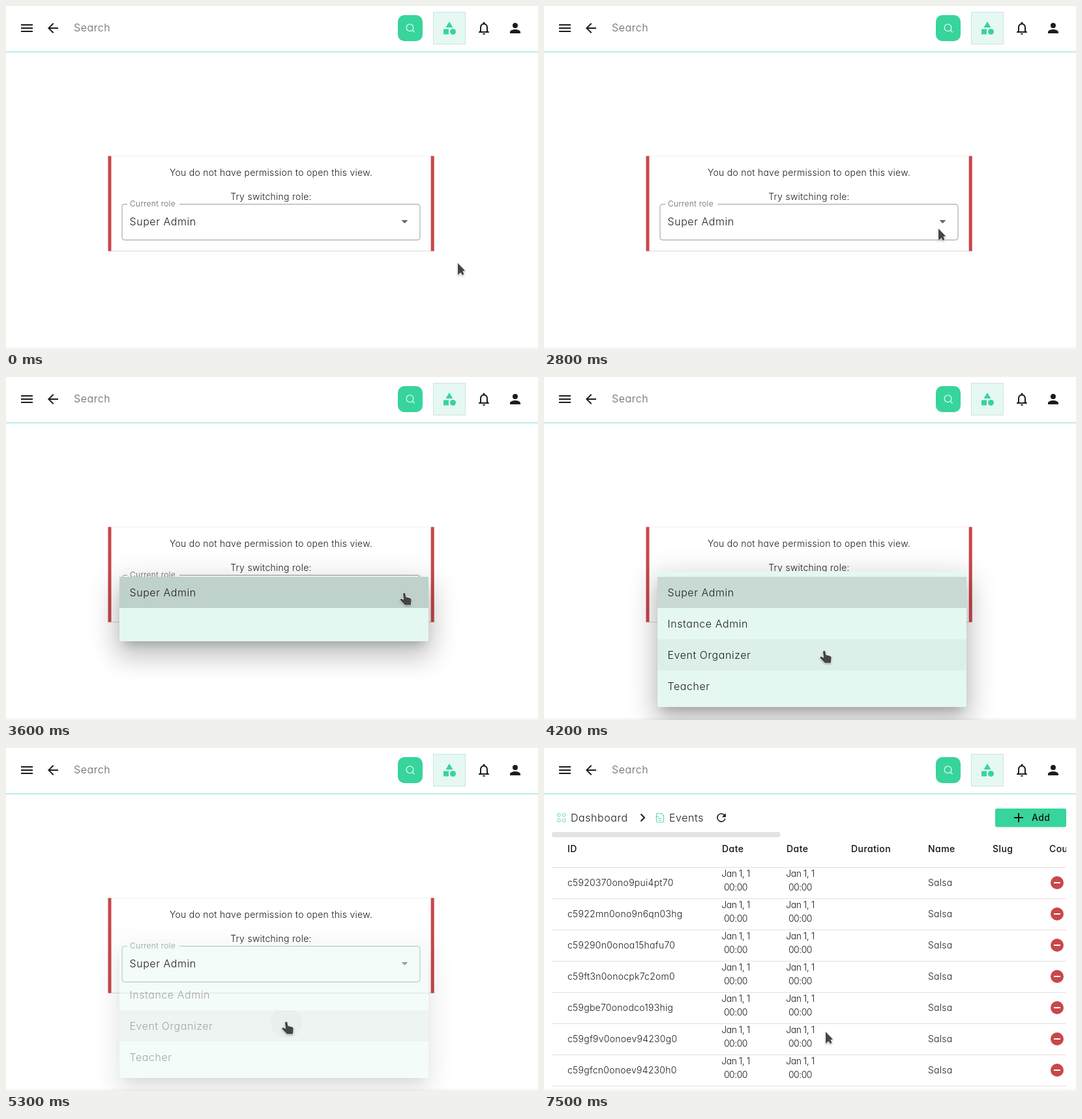
Animation of 816 by 527 pixels, one loop 8.1 s. Source, as an HTML page:

```html
<!DOCTYPE html>
<html lang="en">
<head>
<meta charset="utf-8">
<title>Role switch</title>
<style>
  html, body { margin: 0; width: 100%; height: 100%; overflow: hidden; background: #fff; }
  #stage { position: relative; width: 816px; height: 527px; overflow: hidden; }
  #stage > svg { position: absolute; left: 0; top: 0; }
  text, .row { font-family: Inter, "Open Sans", sans-serif; font-weight: 300; font-feature-settings: "cv11"; fill: #1e1e1e; color: #1e1e1e; }
  .t16, .row { font-size: 16px; letter-spacing: .55px; }
  .t14 { font-size: 14px; letter-spacing: .27px; }
  .t12 { font-size: 12px; letter-spacing: .3px; }
  .id { font-size: 14px; letter-spacing: .27px; }
  .date { font-size: 14px; letter-spacing: -.5px; text-anchor: middle; }
  .head { font-size: 14px; letter-spacing: .45px; font-weight: 500; fill: #111; }
  .mid { text-anchor: middle; }
  .soft { fill: #606060; }
  .line { fill: none; stroke-width: 1; }
  #menu {
    position: absolute; left: 173.5px; width: 474px; overflow: hidden; background: #e4f8f1; border-radius: 1px;
    box-shadow: 0 11px 15px -7px rgba(0,0,0,.2), 0 24px 38px 3px rgba(0,0,0,.14), 0 9px 46px 8px rgba(0,0,0,.12);
  }
  .row { position: absolute; left: 0; width: 100%; height: 48px; line-height: 48px; overflow: hidden; }
  .row span { position: absolute; left: 16px; top: 0; }
  #ripple { position: absolute; left: 256.5px; top: 18.5px; border-radius: 50%; background: rgba(0,0,0,.06); transform: translate(-50%, -50%); }
</style>
</head>
<body>
<div id="stage">
  <svg width="816" height="527" viewBox="0 0 816 527">
    <defs>
      <linearGradient id="fade" x1="0" y1="0" x2="0" y2="1">
        <stop offset="0" stop-color="#000" stop-opacity="0"/>
        <stop offset="1" stop-color="#000" stop-opacity=".045"/>
      </linearGradient>
      <clipPath id="pane"><rect x="12" y="120" width="789" height="407"/></clipPath>
    </defs>

    <rect y="70" width="816" height="1" fill="#80dfc4"/>
    <g fill="#1c1c1c">
      <path transform="translate(20 22)" d="M3 18h18v-2H3zM3 13h18v-2H3zM3 6v2h18V6z"/>
      <path transform="translate(60 22)" d="M20 11H7.8l5.6-5.6L12 4l-8 8 8 8 1.4-1.4L7.8 13H20z"/>
      <path transform="translate(721 22)" fill-rule="evenodd" d="M12 22a2 2 0 0 0 2-2h-4a2 2 0 0 0 2 2zM18 16v-5c0-3.1-1.6-5.6-4.5-6.3V4a1.5 1.5 0 0 0-3 0v.7C7.6 5.4 6 7.9 6 11v5l-2 2v1h16v-1zM16 17H8v-6c0-2.5 1.5-4.5 4-4.5s4 2 4 4.5z"/>
      <path transform="translate(769 22)" d="M12 12a4 4 0 1 0 0-8 4 4 0 0 0 0 8zM12 14c-2.7 0-8 1.3-8 4v2h16v-2c0-2.7-5.3-4-8-4z"/>
    </g>
    <text class="t16 soft" x="104" y="39">Search</text>
    <rect x="601" y="14" width="38" height="40" rx="10" fill="#37d49b"/>
    <g class="line" stroke="#d9fff0" style="stroke-width:1.3">
      <circle cx="619.5" cy="33.3" r="5.4"/>
      <path d="M623.4 37.3l3.2 3.2"/>
    </g>
    <rect x="655.5" y="9.5" width="49" height="49" fill="#e6f8f3" stroke="#cfe3dc"/>
    <g transform="translate(668 22)" fill="#37d49b">
      <path d="M12 2l-5.5 9h11z"/><circle cx="17.5" cy="17.5" r="4.5"/><rect x="3" y="13.5" width="8" height="8"/>
    </g>

    <g id="card">
      <rect x="157" y="230" width="500" height="1" fill="#f1f1f1"/>
      <rect x="157" y="376" width="500" height="1" fill="#d9d9d9"/>
      <rect x="156.5" y="230.5" width="5" height="146" fill="#c8474a"/>
      <rect x="651.7" y="230.5" width="5" height="146" fill="#c8474a"/>
      <text class="t14 mid" x="406.5" y="261">You do not have permission to open this view.</text>
      <text class="t14 mid" x="406.5" y="298">Try switching role:</text>
      <path class="line" stroke="#9b9b9b" d="M186 304.5h-4a4 4 0 0 0-4 4v47a4 4 0 0 0 4 4h449a4 4 0 0 0 4-4v-47a4 4 0 0 0-4-4H266"/>
      <text class="t12 soft" x="190" y="308">Current role</text>
      <text class="t16" x="189.5" y="337">Super Admin</text>
      <path fill="#666" d="M606.5 329h10l-5 5z"/>
    </g>

    <g id="crumbs">
      <g class="line" stroke="#5fdcb4">
        <rect x="20.5" y="100.5" width="4.5" height="4.5" rx="1.2"/>
        <rect x="28.5" y="100.5" width="4.5" height="4.5" rx="1.2"/>
        <rect x="20.5" y="109" width="4.5" height="4.5" rx="1.2"/>
        <rect x="28.5" y="109" width="4.5" height="4.5" rx="1.2"/>
        <path d="M173.5 100.5h6.5l3.5 3.5v8.5a1.5 1.5 0 0 1-1.5 1.5h-8a1.5 1.5 0 0 1-1.5-1.5v-10.5a1.5 1.5 0 0 1 1-1.5zM171 105.5h5M175 108h5.5M175 111h5.5" style="stroke-width:1.2"/>
      </g>
      <text class="t16" x="41" y="113">Dashboard</text>
      <path class="line" stroke="#1c1c1c" style="stroke-width:2" d="M148.5 101.5l5.5 5.5-5.5 5.5"/>
      <text class="t16" x="192" y="113">Events</text>
      <path fill="#1c1c1c" transform="translate(261.7 96.7) scale(.86)" d="M17.65 6.35A8 8 0 1 0 19.73 14h-2.08A6 6 0 1 1 12 6c1.66 0 3.14.69 4.22 1.78L13 11h7V4z"/>
      <rect x="692" y="93" width="109" height="28.5" rx="3" fill="#37d49b"/>
      <path class="line" stroke="#111" style="stroke-width:2" d="M721 107h14M728 100v14"/>
      <text class="head" x="748" y="112">Add</text>
    </g>

    <g id="table" clip-path="url(#pane)">
      <rect id="bar" x="12" y="129" width="350.5" height="8" rx="3.5"/>
    </g>
    <rect y="522" width="816" height="5" fill="url(#fade)"/>
  </svg>

  <div id="menu"></div>

  <svg width="816" height="527" viewBox="0 0 816 527">
    <g fill="#454545" id="cursor" stroke="#fff" stroke-width="1.6" stroke-linejoin="round" paint-order="stroke" style="filter:drop-shadow(0 1px 1px rgba(0,0,0,.3))">
      <path id="arrow" d="M0 0L11 11.5L7.5 12.5L9.5 17L7 18.5L4.5 14.5L0 18Z"/>
      <path id="hand" d="M-2 2.5Q-2 .5 -.3 .5Q1.3 .5 1.6 2.5L2.4 7L9 8.7Q11 9.2 10.7 11.5L10 19.5H1L-1 17.5L-6.6 11.5Q-6.3 8.7 -4 9.7L-1 11.5Z"/>
    </g>
  </svg>
</div>

<script>
const LOOP = 8100;
const $ = id => document.getElementById(id);

function add(parent, tag, attrs, text = "") {
  const el = document.createElementNS("http://www.w3.org/2000/svg", tag);
  for (const k in attrs) el.setAttribute(k, attrs[k]);
  el.textContent = text;
  parent.append(el);
}

function buildTable() {
  const table = $("table");
  const label = (cls, x, y, s) => add(table, "text", { class: cls, x, y }, s);
  const rule = y => add(table, "rect", { x: 12, y, width: 789, height: 1, fill: "#dfdfdf" });
  const heads = [["ID", 36], ["Date", 273], ["Date", 372], ["Duration", 471], ["Name", 589], ["Slug", 688], ["Count", 775]];
  heads.forEach(([s, x]) => label("head", x, 160, s));
  rule(183);
  const ids = ["c5920370ono9pui4pt70", "c5922mn0ono9n6qn03hg", "c59290n0onoa15hafu70", "c59ft3n0onocpk7c2om0",
    "c59gbe70onodco193hig", "c59gf9v0onoev94230g0", "c59gfcn0onoev94230h0"];
  ids.forEach((id, i) => {
    const y = 207 + 48 * i;
    label("id", 36, y + 5, id);
    for (const x of [294, 393]) {
      label("date", x, y - 9, "Jan 1, 1");
      label("date", x, y + 12, "00:00");
    }
    label("t14", 589, y + 5, "Salsa");
    add(table, "circle", { cx: 787, cy: y, r: 10, fill: "#c8474a" });
    add(table, "rect", { x: 782, y: y - 1, width: 10, height: 2, fill: "#fff" });
    rule(y + 24);
  });
}

const rows = ["Super Admin", "Instance Admin", "Event Organizer", "Teacher"].map(s => {
  const row = document.createElement("div");
  const span = document.createElement("span");
  row.className = "row";
  span.textContent = s;
  row.append(span);
  $("menu").append(row);
  return row;
});
const ripple = document.createElement("div");
ripple.id = "ripple";
rows[2].append(ripple);
buildTable();

// time, x, y, pointing hand
const path = [
  [0, 693, 395, 0],
  [900, 667, 391, 0], [1000, 570, 374, 0], [1100, 478, 359, 0], [1200, 438, 352, 0],
  [2800, 605, 342, 0], [2900, 665, 339, 0],
  [3100, 660, 338, 0], [3200, 638, 335, 0], [3300, 618, 332, 0], [3400, 611, 331, 1],
  [4000, 585, 344, 1], [4100, 480, 396, 1], [4200, 430, 420, 1],
  [5400, 430, 421, 0],
  [7200, 430, 424, 0], [7300, 430, 429, 0], [7400, 431, 433, 0], [7500, 432, 436, 0]
];

// time, top, bottom, opacity, text opacity, first row, third row, ripple radius
const menuSteps = [
  [0, 299, 507, 0, 0, "", "", 0],
  [3600, 307, 406, 1, 0, "#bfd1cb", "", 0],
  [3700, 302, 470, 1, .5, "#bfd1cb", "", 0],
  [3800, 299, 507, 1, 1, "#c1d3cd", "", 0],
  [4200, 299, 507, 1, 1, "#c8dad3", "#dcf0e9", 0],
  [5100, 299, 507, 1, 1, "#c8dad3", "#dcf0e9", 10],
  [5200, 299, 507, 1, 1, "", "#d5e6df", 21.5],
  [5300, 299, 507, .4, 1, "", "#d5e6df", 24],
  [5400, 299, 507, 0, 0, "", "", 0]
];

const at = (steps, t) => steps.findLast(s => s[0] <= t);
const show = (id, on) => { $(id).style.visibility = on ? "visible" : "hidden"; };

function draw(t) {
  const [, x, y, hand] = at(path, t);
  $("cursor").setAttribute("transform", `translate(${x} ${y})`);
  show("arrow", !hand);
  show("hand", hand);

  const [, top, bottom, alpha, ink, first, third, r] = at(menuSteps, t);
  const menu = $("menu").style;
  menu.top = top + "px";
  menu.height = bottom - top + "px";
  menu.opacity = alpha;
  rows.forEach((row, i) => {
    row.style.top = 307 + 48 * i - top + "px";
    row.firstChild.style.opacity = i ? ink : 1;
  });
  rows[0].style.background = first;
  rows[2].style.background = third;
  ripple.style.width = ripple.style.height = 2 * r + "px";

  show("card", t < 5400);
  show("crumbs", t >= 5400);
  show("table", t >= 5600);
  $("table").style.opacity = t < 5700 ? .6 : 1;
  $("bar").setAttribute("fill", t < 7200 ? "#e9e9e9" : "#e3e3e3");
}

function tick() {
  draw(performance.now() % LOOP);
  requestAnimationFrame(tick);
}
tick();
</script>
</body>
</html>
```
